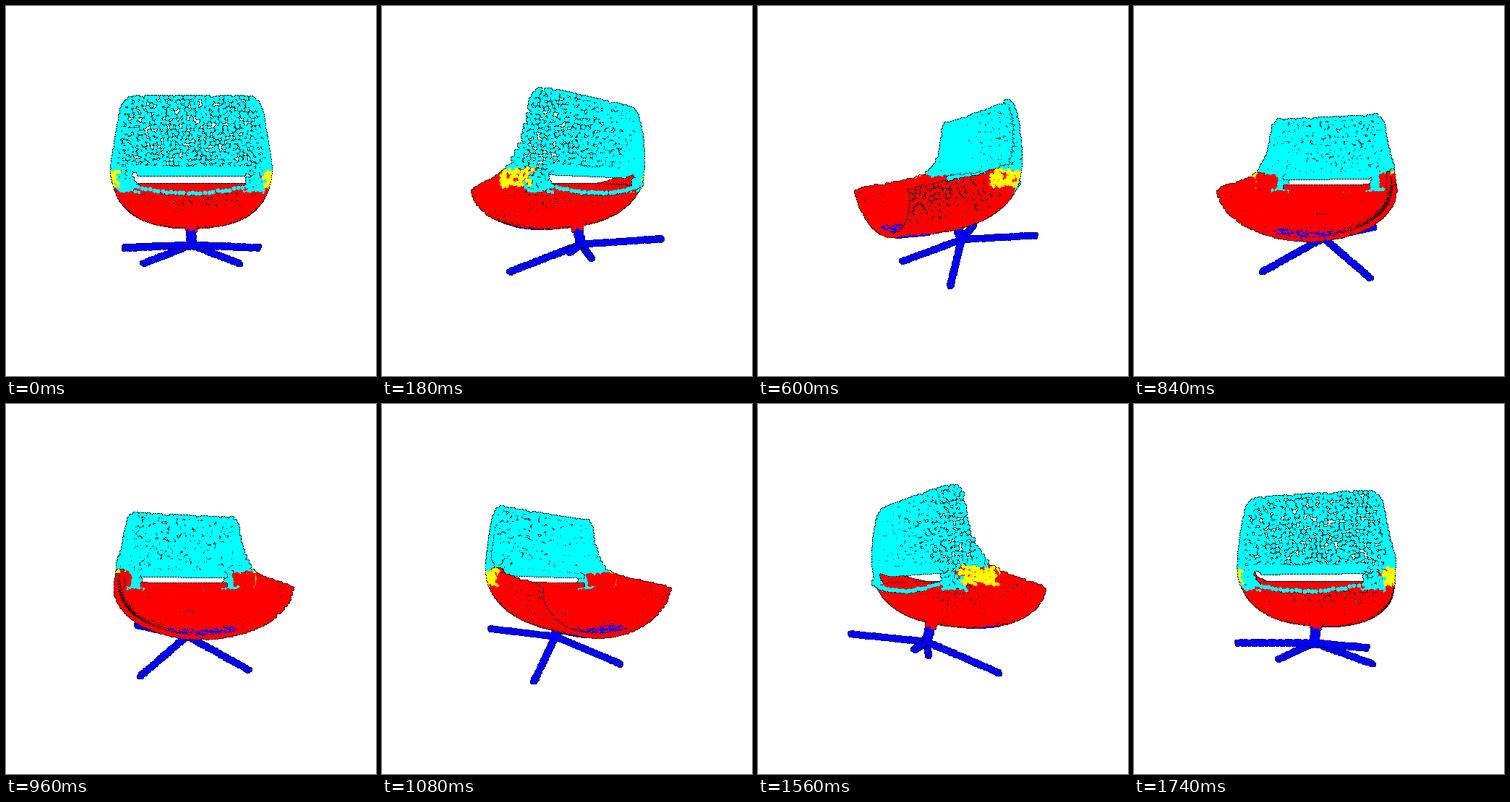
Recreate the animation shown at these times as a matplotlib script. Size 512 by 512 pixels, loop 1800 ms.

```python
import numpy as np
import matplotlib.pyplot as plt
from matplotlib.animation import FuncAnimation

SIZE, FRAMES, INTERVAL = 512, 30, 60
DIST = 430  # camera distance, also the focal length in pixels
RED, BLUE, CYAN, YELLOW, BLACK = range(5)
PALETTE = np.array([[255, 0, 0], [0, 0, 255], [0, 255, 255],
                    [255, 255, 0], [0, 0, 0]], np.uint8)
rng = np.random.default_rng(7)


def bezier(t, p0, p1, p2, p3):
    t = t[:, None]
    s = 1 - t
    p0, p1, p2, p3 = np.array([p0, p1, p2, p3])
    return (s ** 3 * p0 + 3 * s * s * t * p1 + 3 * s * t * t * p2
            + t ** 3 * p3).T


def shell_point(t, u):
    """t runs from the front lip to the top of the back, u from side to side."""
    rim_b, rim_h = bezier(t, (-94, 2), (20, 24), (54, 14), (47, 112))
    mid_b, mid_h = bezier(t, (-83, -54), (30, -52), (90, -40), (57, 113))
    half = 99 - 40 * np.maximum(t - .62, 0) - 8 * t ** 60
    q = 2 + 2.2 * t  # the section gets squarer towards the back
    c = (1 - np.abs(u) ** q) ** (1 / q)
    return np.stack([rim_b + (mid_b - rim_b) * c, half * u,
                     rim_h + (mid_h - rim_h) * c], 1)


def thin(points, gap):
    """Indices of points that are at least their own gap apart."""
    kept = np.empty_like(points)
    index = []
    for i, p in enumerate(points):
        n = len(index)
        d = kept[:n] - p
        if n == 0 or np.einsum("ij,ij->i", d, d).min() > gap[i] ** 2:
            kept[n] = p
            index.append(i)
    return np.array(index)


def shell():
    n = 26000
    t = np.clip(rng.uniform(-.02, 1.02, n), 0, 1)
    u = rng.uniform(-1, 1, n)
    u[::2] = np.sign(u[::2]) * (1 - np.abs(u[::2]) ** 3)  # crowd the rim
    pts = shell_point(t, u)
    keep = thin(pts, np.where(t > .69, 3.7, 3.1))
    pts, t = pts[keep], t[keep]

    b, l, h = pts.T
    side = np.abs(l)
    chance = rng.random(len(pts))
    color = np.full(len(pts), RED)
    color[(t > .69) | ((b > 46) & (h > -1) & (side > 62))
          | ((b > 8) & (h > 25))] = CYAN
    arm = (side > 87) & (b > 4) & (b < 58) & (h > 5) & (h < 25)
    color[arm & (chance < .85)] = YELLOW
    color[(b > -78) & (b < -42) & (side < 42) & (h < -42)
          & (chance < .5)] = BLUE
    lining = pts[arm] * [1, .95, 1]
    slot = (side < 66) & (h > 3) & (h < 27) & (b > 40)
    return (np.concatenate([pts[~slot], lining]),
            np.concatenate([color[~slot], np.full(len(lining), RED)]))


def strip(start, end, color):
    """A folded edge along the slot."""
    l, k = np.meshgrid(np.arange(-64, 65, 4), np.linspace(0, 1, 6))
    l, k = l.ravel(), k.ravel()
    pts = np.stack([start[0] + (end[0] - start[0]) * k, l,
                    start[1] + (end[1] - start[1]) * k], 1)
    return pts, np.full(l.size, color)


def seam():
    l = np.arange(-82, 83, 4.9)
    pts = np.stack([68 - 7 * (l / 82) ** 4, l, -2 + 7 * (l / 62) ** 2], 1)
    return pts + rng.uniform(-.8, .8, pts.shape), np.full(l.size, CYAN)


def plate():
    n = 260
    pts = shell_point(rng.uniform(.02, .14, n), rng.uniform(-.42, .42, n))
    return pts - [0, 0, 1], np.full(n, BLUE)


def base_to_world(p):
    """The base leans forward by about twenty degrees."""
    b, l, up = p.T
    return np.stack([30 + .943 * b - .335 * up, l,
                     -69 + .335 * b + .943 * up], 1)


def tube(a, z, radius, n, color):
    a, z = np.array(a, float), np.array(z, float)
    axis = (z - a) / np.linalg.norm(z - a)
    e1 = np.cross(axis, [1, 0, 0])
    e1 /= np.linalg.norm(e1)
    e2 = np.cross(axis, e1)
    k = (np.arange(n) + .5)[:, None] / n
    ang = np.arange(n)[:, None] * 2.39996
    pts = a + (z - a) * k + radius * (np.cos(ang) * e1 + np.sin(ang) * e2)
    return base_to_world(pts), np.full(n, color)


parts = [shell(), seam(), plate(),
         strip((64, 3), (46, 7), RED), strip((64, 27), (46, 21.5), CYAN),
         tube((0, 0, -4), (0, 0, 20), 3.6, 36, BLUE),
         tube((0, 0, 19), (0, 0, 36), 5, 36, RED)]
parts += [tube((0, 0, 0), (72 * i, 72 * j, -15.4), 1.6, 100, BLUE)
          for i in (-1, 1) for j in (-1, 1)]
points = np.concatenate([p for p, _ in parts])
colors = np.concatenate([c for _, c in parts])

# Ball footprint: a coloured disc with a thin black edge set further back.
dy, dx = (g.ravel() for g in np.mgrid[-4:5, -4:5])
r2 = dx ** 2 + dy ** 2
dx, dy, r2 = dx[r2 < 14], dy[r2 < 14], r2[r2 < 14]
edge = r2 > 9
bump = np.where(edge, -8, np.sqrt(np.maximum(9.5 - r2, 0)))


def render(i):
    a = 2 * np.pi * i / FRAMES
    b, l, h = points.T
    x = b * np.sin(a) + l * np.cos(a)
    near = b * np.cos(a) - l * np.sin(a)
    s = DIST / (DIST - near)
    px = np.rint(SIZE / 2 + s * x).astype(int)[:, None] + dx
    py = np.rint(SIZE / 2 - s * h).astype(int)[:, None] + dy
    depth = (near[:, None] + bump).ravel()
    ink = np.where(edge, BLACK, colors[:, None]).ravel()
    order = np.argsort(depth, kind="stable")
    img = np.full((SIZE * SIZE, 3), 255, np.uint8)
    img[(py * SIZE + px).ravel()[order]] = PALETTE[ink[order]]
    return img.reshape(SIZE, SIZE, 3)


fig = plt.figure(figsize=(5.12, 5.12), dpi=100, facecolor="white")
ax = fig.add_axes([0, 0, 1, 1])
ax.axis("off")
view = ax.imshow(render(0), interpolation="nearest", aspect="auto")


def update(i):
    view.set_data(render(i))
    return [view]


anim = FuncAnimation(fig, update, frames=FRAMES, interval=INTERVAL,
                     repeat=True, repeat_delay=0, blit=False)
plt.show()
```
